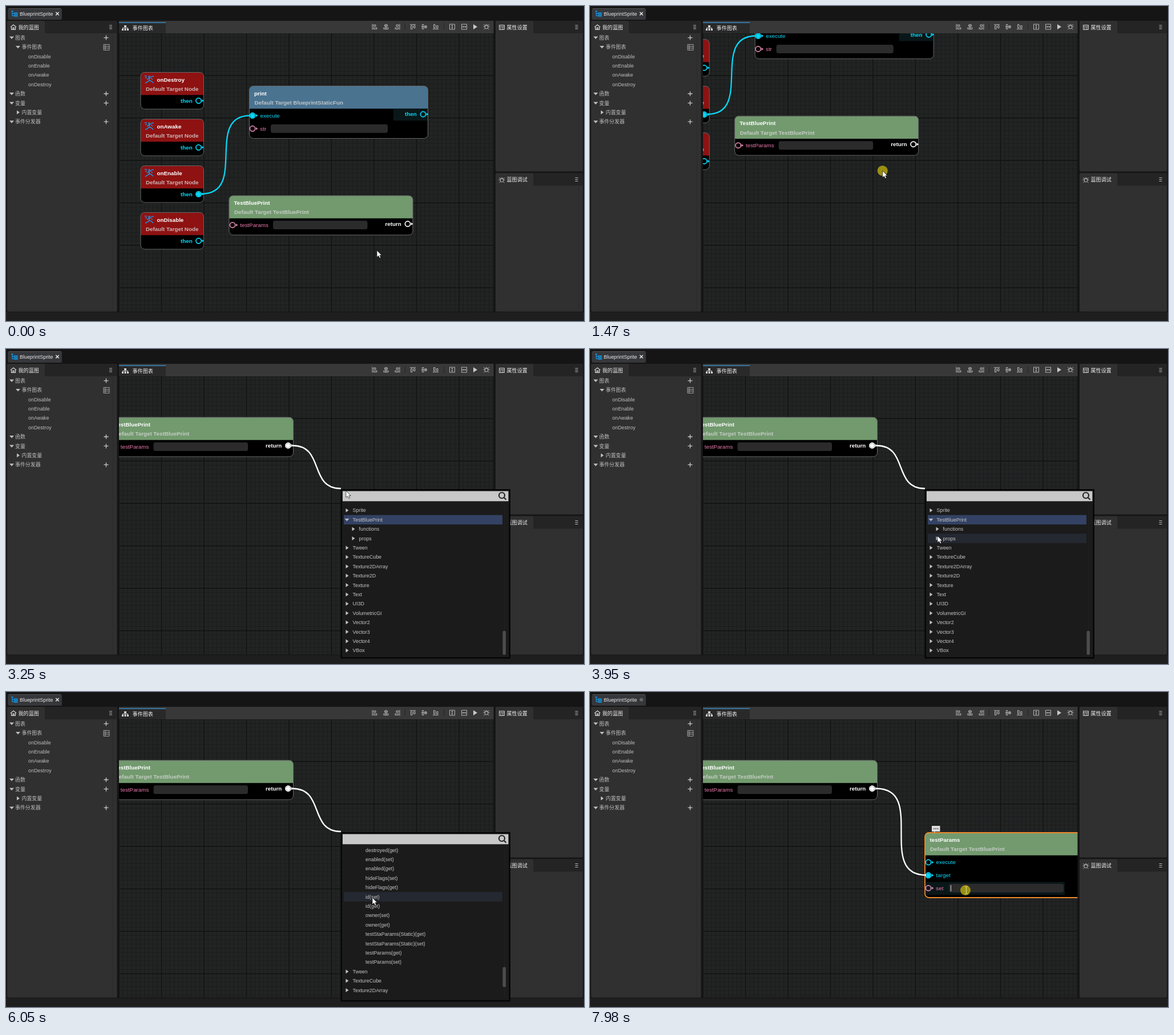
Write an HTML page with a canvas that moves like this. It is 1013 by 553 pixels and loops after 8 s.

```html
<!DOCTYPE html>
<html lang="zh-CN">
<head>
<meta charset="utf-8">
<title>Blueprint editor</title>
<style>
html, body { margin: 0; width: 100%; height: 100%; overflow: hidden; background: #151515; }
canvas { display: block; width: 1013px; height: 553px; }
</style>
</head>
<body>
<canvas id="stage" width="1013" height="553"></canvas>
<script>
const ctx = document.getElementById('stage').getContext('2d');
const LOOP = 8000, ROW = 16.4, NOTCH = 46.55;
const FONT = '"Liberation Sans", "Noto Sans CJK SC", "Noto Sans CJK", sans-serif';
const CYAN = '#08d8f8', PINK = '#e878aa', WHITE = '#fff', ICON = '#b4b4b4';

// Bursts of screen updates: start, end, number of updates.
const BURSTS = [[0, 0, 1], [1240, 1620, 6], [1790, 2560, 11], [2630, 2790, 3], [2940, 3720, 11],
  [3800, 4340, 8], [4490, 4790, 5], [4960, 4960, 1], [5340, 5570, 4], [6050, 6660, 9],
  [7060, 7820, 11], [7900, 7980, 2]];
// Pointer path: time, x, y.
const PATH = [[0, 650, 429], [1240, 621, 399], [1620, 440.5, 216], [1790, 445, 213], [2250, 494, 170],
  [2406, 496, 171], [2483, 532, 189], [2560, 559, 211], [2630, 575, 232], [2790, 587, 246],
  [2940, 587, 246], [3400, 600, 250], [3720, 606, 253], [3800, 608, 270], [3954, 609, 328],
  [4340, 611, 332], [4490, 618, 340], [4790, 640, 374], [4960, 640, 374], [5340, 640, 356],
  [5570, 642, 358], [6050, 642, 361], [6200, 643, 312], [6660, 645, 469], [7060, 645, 469],
  [7820, 658, 348], [8000, 658, 348]];
const PRESSES = [[1240, 1600], [2400, 2940], [4100, 4300], [6660, 7060], [7900, 8000]];

const PROPS = [['awaked', 'sg'], ['aaa', 'sg'], ['bbb(Static)', 'gs'], ['destroyed', 'sg'], ['enabled', 'sg'],
  ['hideFlags', 'sg'], ['id', 'sg'], ['owner', 'sg'], ['testStaParams(Static)', 'gs'], ['testParams', 'gs']]
  .flatMap(([name, order]) => [...order].map(c => [`${name}(${c === 's' ? 'set' : 'get'})`, 2]));
const HEAD = [['Sprite', 0], ['TestBluePrint', 0], ['functions', 1], ['props', 1]];
const TAIL = ['Tween', 'TextureCube', 'Texture2DArray', 'Texture2D', 'Texture', 'Text', 'UI3D', 'VolumetricGI',
  'Vector2', 'Vector3', 'Vector4', 'VBox'].map(name => [name, 0]);

function snap(t) {
  const [a, b, n] = BURSTS.findLast(burst => burst[0] <= t);
  if (n < 2) return a;
  const step = (b - a) / (n - 1);
  return a + step * Math.min(n - 1, Math.floor((t - a + 5) / step));
}
function pointerAt(t) {
  const i = PATH.findIndex(p => p[0] > t), [t0, x0, y0] = PATH[i - 1], [t1, x1, y1] = PATH[i];
  const k = (t - t0) / (t1 - t0);
  return { x: x0 + (x1 - x0) * k, y: y0 + (y1 - y0) * k };
}

function rect(x, y, w, h, fill, r = 0) {
  ctx.fillStyle = fill;
  ctx.beginPath();
  ctx.roundRect(x, y, w, h, r);
  ctx.fill();
}
function text(str, x, cy, color = '#bcbcbc', size = 8.94, weight = 400) {
  ctx.font = `${weight} ${size}px ${FONT}`;
  ctx.fillStyle = color;
  ctx.fillText(str, x, cy + size * .35);
}
const bold = (str, x, cy, color) => text(str, x, cy, color, 9.8, 700);
function shape(x, y, d, { fill, stroke, width = 1 }) {
  const path = new Path2D(d);
  ctx.save();
  ctx.translate(x, y);
  if (fill) { ctx.fillStyle = fill; ctx.fill(path); }
  if (stroke) { ctx.strokeStyle = stroke; ctx.lineWidth = width; ctx.stroke(path); }
  ctx.restore();
}
function disc(x, y, r, fill) {
  ctx.fillStyle = fill;
  ctx.beginPath();
  ctx.arc(x, y, r, 0, 7);
  ctx.fill();
}
function clipped(x, y, w, h, draw) {
  ctx.save();
  ctx.beginPath();
  ctx.rect(x, y, w, h);
  ctx.clip();
  draw();
  ctx.restore();
}
const triangle = (x, y, open, color = '#c0c0c0') =>
  shape(x, y, open ? 'M-4-2H4L0 2.5Z' : 'M-2-3.5L3 0L-2 3.5Z', { fill: color });
const plus = y => shape(175.5, y, 'M-4 0H4M0-4V4', { stroke: '#c8c8c8', width: 1.3 });
const burger = (x, y) => shape(x, y, 'M-2.5-3H2.5M-2.5 0H2.5M-2.5 3H2.5', { stroke: '#bbb' });
const bug = (x, y) => shape(x, y, 'M-2-2a2 2 0 0 1 4 0M-2.5-2h5v3a2.5 2.5 0 0 1-5 0ZM-5-4l2.5 2M5-4L2.5-2M-5.5 0h3M5.5 0h-3M-4.5 4.5l2.5-2M4.5 4.5l-2.5-2', { stroke: ICON });

function panel(x, y, w, h, tabWidth, title) {
  rect(x, y, w, h, '#303030', 2);
  rect(x, y, w, 22, '#242424', 2);
  rect(x, y, tabWidth, 23, '#303030', 2);
  text(title, x + 19.5, y + 11.8, '#eee', 9.1, 500);
  burger(x + w - 11, y + 11);
}

function drawLeft(saved) {
  rect(3, 4, 95, 20, '#36373a', 3);
  rect(5, 4, 91, 1, '#55565a');
  shape(9, 8, 'M0 1H4M2 1V9H6M2 5H6M6 4H11V6H6ZM6 8H11V10H6Z', { stroke: '#1590d8', width: 1.3 });
  text('BlueprintSprite', 24, 13.5, '#e8e8e8');
  if (saved) shape(90, 13.5, 'M-2.7-2.7L2.7 2.7M2.7-2.7L-2.7 2.7', { stroke: '#eee', width: 1.4 });
  else disc(90, 13.5, 3, '#66686b');

  panel(2, 26, 192.5, 510.5, 66, '我的蓝图');
  rect(187, 49, 1, 487, '#2b2b2b');
  shape(13, 37, 'M-5 0L0-4L5 0M-3.5 0V4.5H3.5V0M-1 4V1H1V4', { stroke: '#ddd', width: 1.2 });
  const rows = [['图表', 0], ['事件图表', 1], ['onDisable', 2], ['onEnable', 2], ['onAwake', 2],
    ['onDestroy', 2], ['函数', 0], ['变量', 0], ['内置变量', 1], ['事件分发器', 0]];
  rows.forEach(([name, level], i) => {
    const y = 55.6 + i * ROW;
    if (level < 2) triangle(10 + level * 11, y, name !== '内置变量');
    text(name, [16, 27.5, 39][level], y);
    if (!level) plus(y);
  });
  shape(170.5, 67, 'M.5.5H10.5V10.5H.5ZM.5 4H10.5M.5 7H10.5M3.5 0V10', { stroke: '#aaa', width: .9 });
}

function drawRight() {
  panel(858, 26, 153, 264.5, 66, '属性设置');
  panel(858, 293.5, 153, 243, 66, '蓝图调试');
  rect(1003, 49, 1, 241, '#2b2b2b');
  rect(1003, 317, 1, 219, '#2b2b2b');
  shape(864, 33, 'M.5.5H9.5V8.5H.5ZM.5 3H9.5M2 5H4M5.5 5H8M2 7H4M5.5 7H8', { stroke: '#ccc' });
  bug(869, 305.5);
}

function drawToolbar() {
  rect(198, 26, 656.5, 22, '#383838');
  rect(198, 29, 82, 19, '#292929');
  rect(198, 28.5, 82, 1.6, '#3585c0');
  shape(209, 38, 'M-2-4H2V-1H-2ZM-6 2H-3V5H-6ZM-1.5 2H1.5V5H-1.5ZM3 2H6V5H3Z', { fill: '#ddd' });
  shape(209, 38, 'M0-1V2M-4.5 2V.5H4.5V2', { stroke: '#ddd' });
  text('事件图表', 221.5, 38.5, '#eee', 9.1, 500);
  const align = [
    [646, 36.5, 0, 'M-4-5V5M-2-3.5H2V-1H-2ZM-2 1.5H4V4H-2Z'],
    [666, 36.5, 0, 'M0-5V5M-2.5-3.5H2.5V-1H-2.5ZM-4 1.5H4V4H-4Z'],
    [686, 36.5, 0, 'M4-5V5M-2-3.5H2V-1H-2ZM-4 1.5H2V4H-4Z'],
    [713, 36.5, 0, 'M-5-4H5M-3.5-2V4H-1V-2ZM1.5-2V2H4V-2Z'],
    [733, 36.5, 0, 'M-5 0H5M-3.5-4V4H-1V-4ZM1.5-2V2H4V-2Z'],
    [753, 36.5, 0, 'M-5 4H5M-3.5-4V2H-1V-4ZM1.5-2V2H4V-2Z'],
    [782, 36.5, 0, 'M-4.5-4.5H4.5V4.5H-4.5ZM0-3V3M-1.5-1.5L0-3L1.5-1.5M-1.5 1.5L0 3L1.5 1.5'],
    [803, 36.5, 0, 'M-4.5-4.5H4.5V4.5H-4.5ZM-3 0H3M-1.5-1.5L-3 0L-1.5 1.5M1.5-1.5L3 0L1.5 1.5'],
  ];
  for (const [x, y, , d] of align) shape(x, y, d, { stroke: ICON });
  shape(822, 36.5, 'M-3-4.5L4 0L-3 4.5Z', { fill: '#c8c8c8' });
  bug(842, 36.5);
  rect(699, 30, 1, 12, '#262626');
  rect(767.5, 30, 1, 12, '#262626');
}

function drawGrid() {
  rect(198, 48, 656.5, 488.5, '#222424');
  for (const axis of [0, 1]) {
    for (let i = 0; i < (axis ? 66 : 89); i++) {
      const p = (axis ? 47.6 : 198) + i * 7.45, major = i % 10 === 0;
      const size = major ? 1.6 : 1, color = major ? '#121313' : '#1b1c1c';
      axis ? rect(198, p - size / 2, 656.5, size, color) : rect(p - size / 2, 48, size, 488.5, color);
    }
  }
}

function pin(x, y, color, filled) {
  ctx.strokeStyle = color;
  ctx.lineWidth = 1.7;
  ctx.beginPath();
  ctx.arc(x, y, 4.6, 0, 7);
  ctx.stroke();
  if (filled) disc(x, y, 3.6, color);
  shape(x, y, 'M5.8-2.5L9.5 0L5.8 2.5Z', { fill: color });
}
function frame(x, y, w, h, color, title, sub, indent = 8.5, border = '#686868') {
  rect(x, y, w, h, '#000', 7);
  clipped(x, y, w, 39.8, () => rect(x, y, w, 60, color, 7));
  ctx.strokeStyle = border;
  ctx.lineWidth = border === '#686868' ? 1 : 1.8;
  ctx.beginPath();
  ctx.roundRect(x, y, w, h, 7);
  ctx.stroke();
  bold(title, x + indent, y + 12.6, WHITE);
  bold(sub, x + 9, y + 29, 'rgba(215,215,215,.82)');
}
function field(label, x, y, boxX, boxW) {
  pin(x, y, '#d886ac');
  text(label, x + 13.3, y, PINK, 9.8);
  rect(boxX, y - 7.5, boxW, 15, '#2b2b2b', 3.5);
}
function wire(x0, y0, x1, y1, color) {
  const d = Math.hypot(x1 - x0, y1 - y0) / 2;
  ctx.strokeStyle = color;
  ctx.lineWidth = 2.3;
  ctx.beginPath();
  ctx.moveTo(x0, y0);
  ctx.bezierCurveTo(x0 + d, y0, x1 - d, y1, x1, y1);
  ctx.stroke();
}
function bubble(x, y, alpha) {
  ctx.globalAlpha = alpha;
  shape(x, y, 'M12-12H26.5V-2H18L16 0V-2H12Z', { fill: '#eee' });
  for (const dx of [16, 19.2, 22.4]) disc(x + dx, y - 7, .9, '#222');
  ctx.globalAlpha = 1;
}

function eventNode(name, y) {
  frame(236, y, 110.5, 64.5, '#8e1212', name, 'Default Target Node', 28.5);
  shape(243, y + 5.5, 'M0 1H4M1 4H4M8 5L13 1.5H16M8 4.5L4 7M8.5 5L8 9L1 13.5M8 8.5L12 10L15 13M11 5L14 7', { stroke: '#1c8fd8', width: 1.5 });
  disc(251, y + 7.5, 1.8, '#1c8fd8');
  bold('then', 306, y + 49.8, CYAN);
  pin(337.5, y + 49.8, CYAN, name === 'onEnable');
}

function drawNodes(t, dx, dy, mouse) {
  ctx.save();
  ctx.translate(dx, dy);
  ['onDestroy', 'onAwake', 'onEnable', 'onDisable'].forEach((name, i) => eventNode(name, 116.5 + i * 82));

  frame(426.5, 140.5, 313, 92, '#4a7390', 'print', 'Default Target BlueprintStaticFun');
  rect(679, 180.3, 60, 21, '#0a1719');
  pin(432, 192.3, CYAN, true);
  text('execute', 445.5, 192.3, CYAN, 9.8);
  bold('then', 699, 190, CYAN);
  pin(731, 190, CYAN);
  field('str', 432, 215.3, 464, 205);
  wire(343, 329.8, 428, 192.3, CYAN);

  frame(391, 333, 322, 69, '#729a6e', 'TestBluePrint', 'Default Target TestBluePrint');
  field('testParams', 397, 384.5, 468, 165.5);
  bold('return', 664.5, 382.5, WHITE);
  pin(704, 382.5, WHITE, t > 2400);
  if (t >= 1240 && t < 1450) bubble(391, 333, .25);
  if (t > 1900 && t < 2800) bubble(391, 333, .5);
  ctx.restore();

  if (t >= 7060) {
    frame(587, 247, 330, 114, '#729a6e', 'testParams', 'Default Target TestBluePrint', 8.5, t >= 7900 ? '#ee8a2c' : '#686868');
    pin(593, 299, CYAN);
    text('execute', 606.5, 299, CYAN, 9.9);
    pin(593, 321.8, CYAN, true);
    text('target', 606.5, 321.8, CYAN, 9.9);
    if (mouse.y < 356) rect(588, 333.5, 244, 22.5, '#0a1719');
    field('set', 593, 344.3, 629, 201);
    if (t >= 7900) {
      rect(632, 339, 1, 11, '#ddd');
      bubble(587, 247, .92);
    }
    wire(502, 169.5, 589, 321.5, WHITE);
  } else if (t >= 2940) wire(502, 169.5, 587, 245, WHITE);
  else if (t > 2410) wire(502, 169.5, mouse.x - 2, mouse.y - 1.5, WHITE);
}

function drawMenu(t, mouse) {
  rect(586.5, 246, 297.5, 297.5, '#060606');
  rect(589, 248.5, 292.5, 292.5, '#1b1b1b');
  rect(590, 249.5, 290.5, 17.8, '#c8c8c8');
  shape(869, 257, 'M5 0A5 5 0 1 1-5 0A5 5 0 1 1 5 0M3.5 3.5L7.5 7.5', { stroke: '#222', width: 2.2 });

  const open = t > 4170;
  const notches = t < 4960 ? 0 : t < 5400 ? 1 : Math.min(4, 2 + Math.floor((t - 5400) / 75));
  const scroll = notches * NOTCH;
  const rows = [...HEAD, ...(open ? PROPS : []), ...TAIL];
  clipped(589, 272, 290, 265, () => {
    rows.forEach(([name, level], i) => {
      const y = 283.3 + i * ROW - scroll, top = y - ROW / 2;
      const hover = mouse.y >= 272 && mouse.y >= top && mouse.y < top + ROW;
      if (name === 'TestBluePrint') rect(592, top, 278, ROW, '#334264');
      else if (hover) rect(592, top, 278, ROW, '#242831');
      if (level < 2) triangle(597.5 + level * 11, y, name === 'TestBluePrint' || (open && name === 'props'));
      text(name, [607.5, 618.5, 630][level], y, '#c4c4c4');
    });
    rect(873.5, 275, 1, 262, '#222');
    const height = 1660 + (open ? PROPS.length * ROW : 0);
    rect(870.5, 272 + (1395 + scroll) * 265 / height, 5.5, 265 * 265 / height, '#4c4c4c', 2.5);
  });
}

function drawPointer(t, { x, y }) {
  if (PRESSES.some(([a, b]) => t >= a && t < b)) disc(x, y, 9, 'rgba(190,174,14,.78)');
  if (t > 7060 && y < 352) shape(x + 1.5, y, 'M-2.5-6.5Q0-6.5 0-5V5Q0 6.5-2.5 6.5M2.5-6.5Q0-6.5 0-5M0 5Q0 6.5 2.5 6.5', { stroke: '#d8d890' });
  else shape(x, y, 'M0 0V12L2.8 9.5L4.7 13.5L6.8 12.6L5 8.7H8.5Z', { fill: '#fff', stroke: '#111', width: .7 });
}

function draw(now) {
  const t = snap(now), mouse = pointerAt(t);
  const pan = pointerAt(Math.min(t, 1620));
  rect(0, 0, 1013, 553, '#151515');
  rect(0, 537.5, 1013, 16, '#1e1e1e');
  drawLeft(t < 7060);
  drawRight();
  drawToolbar();
  clipped(198, 48, 656.5, 488.5, () => {
    drawGrid();
    drawNodes(t, pan.x - 650, pan.y - 429, mouse);
  });
  if (t >= 2940 && t < 7060) drawMenu(t, mouse);
  drawPointer(t, mouse);
}

const start = performance.now();
function tick() {
  draw((performance.now() - start) % LOOP);
  requestAnimationFrame(tick);
}
tick();
</script>
</body>
</html>
```
